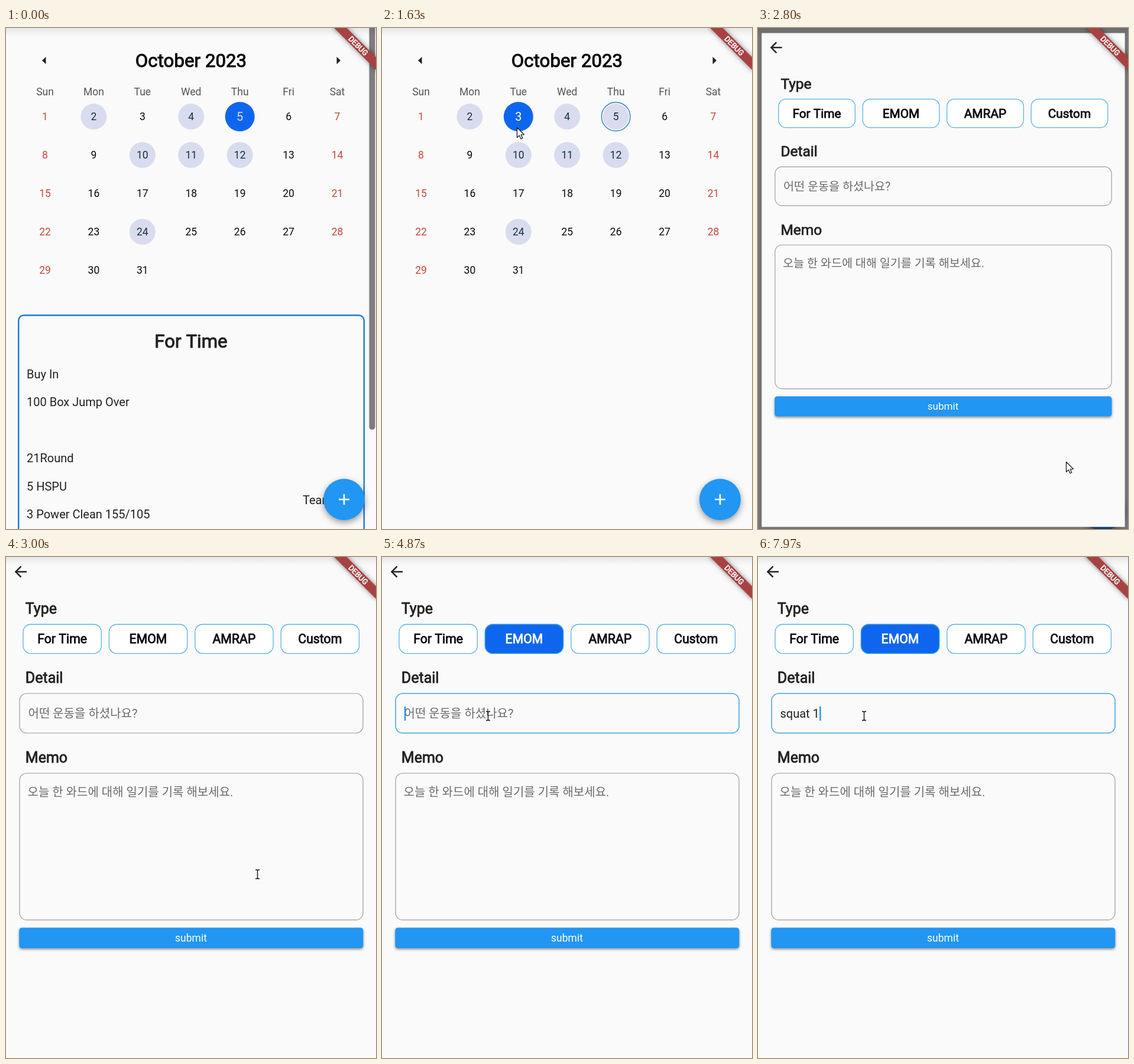
These frames come from a looping animation (626 px wide and 848 px high, 8000 ms). An HTML page with a canvas:

```html
<!DOCTYPE html>
<html lang="en">
<head>
<meta charset="utf-8">
<title>Workout calendar</title>
<style>
  html, body { margin: 0; width: 100%; height: 100%; overflow: hidden; background: #fafafa; }
  canvas { display: block; }
</style>
</head>
<body>
<canvas id="stage" width="626" height="848"></canvas>
<script>
const W = 626, H = 848, LOOP = 8000;
const APP_W = 627, APP_H = 853; // the app reaches slightly past the stage
const ctx = document.getElementById('stage').getContext('2d');
const FONT = 'Roboto, "Noto Sans CJK KR", "Noto Sans KR", "Noto Sans CJK", sans-serif';
const BG = '#fafafa', INK = '#0a0a0a', BODY = '#212121', HINT = '#6b6b6b', EDGE = '#9c9ca4';
const BLUE = '#0f66ee', SKY = '#2196f3', RIM = '#55b4e8';
const WEEK = ['Sun', 'Mon', 'Tue', 'Wed', 'Thu', 'Fri', 'Sat'];
const TYPES = ['For Time', 'EMOM', 'AMRAP', 'Custom'];
const MARKED = [2, 4, 5, 10, 11, 12, 24];
const WORKOUT = ['Buy In', '100 Box Jump Over', '', '21Round', '5 HSPU', '3 Power Clean 155/105'];

// Event times in ms
const PICK_DAY = 1380, PUSH = 2683, PUSH_LEN = 300, PICK_TYPE = 4260, FOCUS = 4780;
const TYPED = 'squat 1', KEYS = [5950, 6150, 6380, 6600, 6850, 7250, 7600];

const clamp = v => Math.max(0, Math.min(1, v));
const ramp = (t, a, b) => clamp((t - a) / (b - a));
const smooth = u => u * u * (3 - 2 * u);
const easeIn = u => u * u;
const easeOut = u => 1 - (1 - u) * (1 - u);

// Pointer stops: time, x, y, easing used to get there
const PATH = [
  [250, 642, 420, smooth], [1030, 221, 154, smooth], [1560, 221, 154, smooth],
  [2380, 564, 801, smooth], [2650, 564, 801, smooth], [2800, 522, 735, easeIn],
  [3880, 235, 146, easeOut], [4360, 235, 146, smooth], [4720, 179, 268, smooth]
];

function bezier(x1, y1, x2, y2) {
  const at = (u, a, b) => 3 * (1 - u) * (1 - u) * u * a + 3 * (1 - u) * u * u * b + u * u * u;
  return x => {
    let lo = 0, hi = 1;
    for (let i = 0; i < 24; i++) {
      const mid = (lo + hi) / 2;
      if (at(mid, x1, x2) < x) lo = mid; else hi = mid;
    }
    return at(lo, y1, y2);
  };
}
const zoomStart = bezier(0.05, 0, 0.1333, 0.06);
const zoomEnd = bezier(0.2083, 0.82, 0.25, 1);
const zoomEase = u => u < 1 / 6 ? 0.4 * zoomStart(u * 6) : 0.4 + 0.6 * zoomEnd((u - 1 / 6) * 1.2);

function text(str, x, y, size, color, { align = 'left', bold = 0 } = {}) {
  ctx.font = `400 ${size}px ${FONT}`;
  ctx.textAlign = align;
  ctx.fillStyle = color;
  ctx.fillText(str, x, y);
  if (bold) {
    ctx.lineWidth = bold;
    ctx.lineJoin = 'round';
    ctx.strokeStyle = color;
    ctx.strokeText(str, x, y);
  }
}

function paint(fill, stroke, line) {
  if (fill) { ctx.fillStyle = fill; ctx.fill(); }
  if (stroke) { ctx.strokeStyle = stroke; ctx.lineWidth = line; ctx.stroke(); }
}

function box(x, y, w, h, r, fill, stroke, line = 1) {
  ctx.beginPath();
  ctx.roundRect(x, y, w, h, r);
  paint(fill, stroke, line);
}

function disc(x, y, r, fill, stroke, line) {
  ctx.beginPath();
  ctx.arc(x, y, r, 0, 7);
  paint(fill, stroke, line);
}

function trace(points, close) {
  ctx.beginPath();
  points.forEach(([x, y]) => ctx.lineTo(x, y));
  if (close) ctx.closePath();
}

function lines(color, width, ...paths) {
  ctx.lineJoin = 'miter';
  for (const p of paths) { trace(p); paint(null, color, width); }
}

function shadowed(color, blur, dy, draw) {
  ctx.save();
  ctx.shadowColor = color;
  ctx.shadowBlur = blur;
  ctx.shadowOffsetY = dy;
  draw();
  ctx.restore();
}

function faded(alpha, draw) {
  if (alpha <= 0) return;
  ctx.save();
  ctx.globalAlpha *= alpha;
  draw();
  ctx.restore();
}

function zoomed(scale, draw) {
  ctx.save();
  ctx.translate(APP_W / 2, APP_H / 2);
  ctx.scale(scale, scale);
  ctx.translate(-APP_W / 2, -APP_H / 2);
  draw();
  ctx.restore();
}

function clearPage() {
  ctx.fillStyle = BG;
  ctx.fillRect(0, 0, APP_W, APP_H);
}

function drawDay(day, t) {
  const col = (day - 1) % 7, x = 66 + 82.42 * col, y = 150 + 65 * Math.floor((day - 1) / 7);
  const moved = ramp(t, PICK_DAY, PICK_DAY + 250);
  const chosen = day === (t < PICK_DAY ? 5 : 3);
  const marked = MARKED.includes(day);
  if (marked) disc(x, y, 22, '#d8dcee');
  if (day === 5) {
    faded(moved, () => disc(x, y, 24.3, null, '#2f7cc4', 1.4));
    faded(1 - moved, () => disc(x, y, 25, BLUE));
  }
  if (day === 3) faded(moved, () => disc(x, y, 25, BLUE));
  let color = marked ? '#16303c' : INK;
  if (col === 0 || col === 6) color = '#c4473f';
  if (chosen) color = day === 5 ? '#d2e0f2' : '#ffffff';
  text(day, x, y + (chosen ? 7 : 6.3), chosen ? 20 : 17.5, color, { align: 'center' });
}

function drawCard() {
  box(21.2, 486.2, 584.6, 420, 9, null, '#1f7ad0', 2.4);
  text('For Time', 313, 541, 31.25, BODY, { align: 'center', bold: 1 });
  WORKOUT.forEach((s, i) => text(s, 35, 593 + 47.4 * i, 20, BODY));
  text('Team', 502, 806, 20, BODY);
}

function drawCalendar(t) {
  clearPage();
  text('October 2023', 313, 66, 31.25, INK, { align: 'center', bold: 1 });
  trace([[61, 55], [67.5, 48.8], [67.5, 61.2]], true);
  paint(BODY);
  trace([[566, 55], [559.5, 48.8], [559.5, 61.2]], true);
  paint(BODY);
  WEEK.forEach((s, i) => text(s, 66 + 82.42 * i, 114, 17.5, '#555555', { align: 'center' }));
  for (let d = 1; d <= 31; d++) drawDay(d, t);
  if (t < PICK_DAY) {
    drawCard();
    box(614.5, -8, 10, 688, 5, '#e6e6e6');
    faded(1 - ramp(t, 480, 680), () => box(614.5, -8, 10, 688, 5, '#7d7d7d'));
  }
  const hover = ramp(t, 2260, 2360);
  shadowed('rgba(0,0,0,.4)', 11, 4, () => disc(572, 798, 35, SKY));
  faded(hover, () => disc(572, 798, 35, '#1f8adc'));
  lines('#ffffff', 2.6, [[563, 798], [581, 798]], [[572, 789], [572, 807]]);
}

function drawDetail(t) {
  const focus = ramp(t, FOCUS, FOCUS + 60);
  box(23, 231, 581, 67, 12, null, EDGE, 1.2);
  faded(focus, () => box(23, 231, 581, 67, 12, null, RIM, 1.6));
  const count = KEYS.filter(k => k <= t).length;
  const value = TYPED.slice(0, count);
  if (value) text(value, 37.5, 272, 20, BODY);
  else text('어떤 운동을 하셨나요?', 37.5, 272, 20, HINT);
  if (t < FOCUS) return;
  const since = t - (count ? KEYS[count - 1] : FOCUS);
  if (Math.floor(since / 500) % 2) return;
  ctx.font = `400 20px ${FONT}`;
  ctx.fillStyle = SKY;
  ctx.fillRect(37.8 + ctx.measureText(value).width, 253, 2.4, 24);
}

function drawForm(t) {
  clearPage();
  lines(BODY, 2.5, [[35, 25], [17, 25]], [[25.5, 15.8], [16.4, 25], [25.5, 34.2]]);
  [['Type', 96], ['Detail', 213], ['Memo', 348]].forEach(([s, y]) =>
    text(s, 32.8, y, 25, BODY, { bold: 0.8 }));
  const picked = ramp(t, PICK_TYPE, PICK_TYPE + 120);
  TYPES.forEach((s, i) => {
    const x = 29 + 145.4 * i;
    const on = i === 1 ? picked : 0;
    box(x, 114, 132.3, 49.3, 13, '#ffffff', RIM, 1.3);
    faded(on, () => box(x, 114, 132.3, 49.3, 13, BLUE, '#3aa0ee', 1.3));
    text(s, x + 66.1, 146, 21.25, on > 0.5 ? '#ffffff' : INK, { align: 'center', bold: 0.8 });
  });
  drawDetail(t);
  box(23, 366, 581, 248.4, 12, null, EDGE, 1.2);
  text('오늘 한 와드에 대해 일기를 기록 해보세요.', 36.5, 405, 20, HINT);
  shadowed('rgba(0,0,0,.45)', 4, 2, () => box(22.3, 627.5, 582, 34.5, 4.5, SKY));
  text('submit', 313, 650.5, 17.5, '#ffffff', { align: 'center' });
}

function drawOverlay() {
  const shade = ctx.createLinearGradient(0, 0, 0, 14);
  shade.addColorStop(0, 'rgba(0,0,0,.08)');
  shade.addColorStop(1, 'rgba(0,0,0,0)');
  ctx.fillStyle = shade;
  ctx.fillRect(0, 0, W, 14);

  ctx.save();
  ctx.translate(W, 0);
  ctx.rotate(Math.PI / 4);
  shadowed('rgba(0,0,0,.5)', 8, 0, () => {
    ctx.fillStyle = '#a84242';
    ctx.fillRect(-52, 35, 104, 15);
  });
  text('DEBUG', 0, 47, 12.75, '#ffffff', { align: 'center', bold: 0.6 });
  ctx.restore();
}

function pointerAt(t) {
  if (t < PATH[0][0]) return null;
  const next = PATH.findIndex(p => p[0] > t);
  if (next < 0) return PATH[PATH.length - 1].slice(1, 3);
  const [t0, x0, y0] = PATH[next - 1], [t1, x1, y1, ease] = PATH[next];
  const u = ease((t - t0) / (t1 - t0));
  return [x0 + (x1 - x0) * u, y0 + (y1 - y0) * u];
}

function outlined(points) {
  trace(points, true);
  ctx.lineJoin = 'round';
  paint('#ffffff', '#111111', 1.2);
}

function drawArrow() {
  outlined([[0, 0], [0, 17], [3.9, 13.4], [6.6, 19.2], [9.3, 18], [6.7, 12.3], [12, 12]]);
}

function drawHand() {
  outlined([[-2.5, 2.5], [-1, 0.8], [0.6, 2.5], [1, 9], [4, 9], [4.6, 10.2], [7, 10], [7.8, 11.4],
    [9, 11.2], [10, 13], [9.6, 18], [8, 21], [8, 25], [-1, 25], [-1.2, 22.5], [-5, 17],
    [-6.8, 13.6], [-5.4, 12.4], [-2.4, 15]]);
  lines('#111111', 1, [[1, 9], [1.2, 13]], [[4.4, 10], [4.5, 13.5]], [[7.6, 11.3], [7.5, 14]]);
}

function drawBeam() {
  lines('#111111', 1.4, [[-3.5, -7], [-1, -7], [0, -6], [1, -7], [3.5, -7]],
    [[0, -6.5], [0, 7.5]], [[-3.5, 8], [-1, 8], [0, 7], [1, 8], [3.5, 8]]);
}

function drawPointer(t) {
  const at = pointerAt(t);
  if (!at) return;
  const [x, y] = at;
  const onForm = t > PUSH;
  const inField = x > 23 && x < 604 && (y > 231 && y < 298 || y > 366 && y < 614);
  ctx.save();
  ctx.translate(Math.round(x) + 0.5, Math.round(y) + 0.5);
  if (!onForm && Math.hypot(x - 572, y - 798) < 35) drawHand();
  else if (onForm && inField) drawBeam();
  else drawArrow();
  ctx.restore();
}

function render(t) {
  const u = ramp(t, PUSH, PUSH + PUSH_LEN), grow = zoomEase(u);
  if (u < 1) {
    zoomed(1 + 0.05 * grow, () => drawCalendar(t));
    ctx.fillStyle = `rgba(0,0,0,${0.6 * ramp(u, 0.2075, 0.4175)})`;
    ctx.fillRect(0, 0, W, H);
  }
  faded(ramp(u, 0.125, 0.25), () => zoomed(0.85 + 0.15 * grow, () => drawForm(t)));
  drawOverlay();
  drawPointer(t);
}

const start = performance.now();
function tick() {
  render((performance.now() - start) % LOOP);
  requestAnimationFrame(tick);
}
tick();
</script>
</body>
</html>
```
